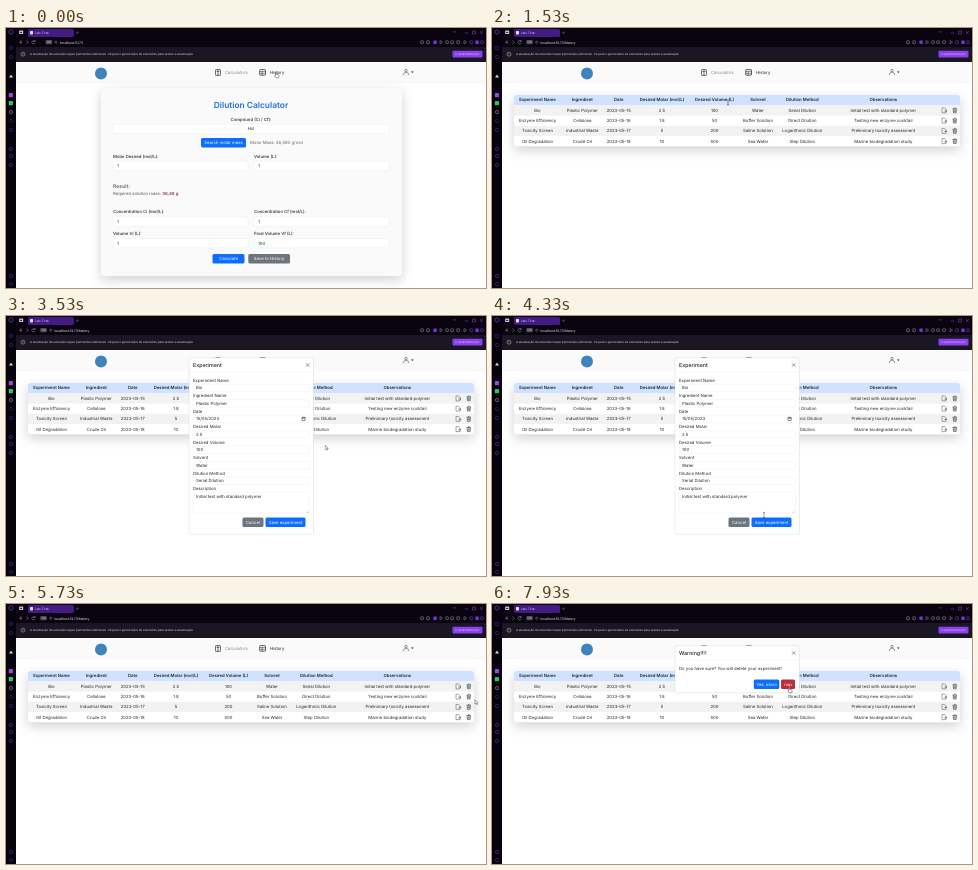
Animation of 480x260 px, one loop 8000 ms. Source, as an HTML page:

```html
<!DOCTYPE html>
<html lang="en">
<head>
<meta charset="utf-8">
<title>Dilution Calculator</title>
<style>
  html, body { margin: 0; width: 100%; height: 100%; overflow: hidden; background: #fff; }
  svg { display: block; width: 480px; height: 260px; }
  text { font-family: Inter, "Open Sans", sans-serif; white-space: pre; text-rendering: geometricPrecision; }
  .plain { font-family: "Liberation Sans", Arial, sans-serif; }
  .shadow { filter: drop-shadow(0 4px 6px rgba(0, 0, 0, .175)); }
</style>
</head>
<body>
<svg id="stage" viewBox="0 0 480 260" xmlns="http://www.w3.org/2000/svg"></svg>
<script>
const BLUE = '#0d6efd', GREY = '#6c757d', INK = '#212529', LINE = '#dee2e6', VIOLET = '#7a35d8';

// Drawing helpers; text is centred vertically on y
const text = (x, y, str, { size = 4.28, fill = INK, weight = 400, anchor = 'start', cls = '' } = {}) =>
  `<text x="${x}" y="${y + size * .35}" font-size="${size}" fill="${fill}" font-weight="${weight}" text-anchor="${anchor}" class="${cls}">${str}</text>`;
const mid = (x, y, str, options) => text(x, y, str, { anchor: 'middle', ...options });
const rect = (x, y, w, h, fill, r = 0, extra = '') =>
  `<rect x="${x}" y="${y}" width="${w}" height="${h}" rx="${r}" fill="${fill}" ${extra}/>`;
const circle = (x, y, r, fill, extra = '') => `<circle cx="${x}" cy="${y}" r="${r}" fill="${fill}" ${extra}/>`;
const stroke = (d, color, width = .6, fill = 'none') =>
  `<path d="${d}" fill="${fill}" stroke="${color}" stroke-width="${width}" stroke-linejoin="round"/>`;
const group = (id, ...parts) => `<g id="${id}">${parts.join('')}</g>`;
const button = (x, y, w, label, fill, h = 9.5) =>
  rect(x, y, w, h, fill, 1.5) + mid(x + w / 2, y + h / 2, label, { fill: '#fff' });
const input = (x, y, w, h, value, pad = 3) =>
  rect(x, y, w, h, '#fff', 1.3, `stroke="${LINE}" stroke-width=".3"`) + text(x + pad, y + h / 2, value);

function browser() {
  const side = [[4, VIOLET], [20, '#4b1e8a'], [29, '#4b1e8a'], [48, '#d8d2e2'], [67, '#9447e8'], [75, '#25c965'],
    [84, '#8f8799'], [93, '#3c1b69'], [102, '#4b1e8a'], [121, '#5a28a5'], [128, '#5a28a5'], [137, '#5a28a5'],
    [248, '#5a28a5'], [256, '#48227c']];
  const tools = [416, 422, 429, 435, 441, 446, 452, 459, 465, 471, 476];
  return rect(0, 0, 480, 34, '#09040f') + rect(0, 0, 10, 260, '#07030c') +
    side.map(([y, c]) => y === 67 || y === 75
      ? rect(2.8, y - 2, 4.2, 4.2, c, .7)
      : y === 48 ? `<path d="M3 49.5L5 46.5L7 49.5Z" fill="${c}"/>`
      : circle(5, y, y === 4 ? 2.1 : 1.6, 'none', `stroke="${c}" stroke-width=".7"`)).join('') +
    rect(13.2, 2.5, 4, 3.6, '#d8d2e2', .6) + rect(14.2, 3.8, 2, 1.2, '#241335') +
    rect(22, 1, 46, 8, '#421c82', 1.5) + rect(24, 3, 3, 3.4, '#e4daf2', .6) +
    text(29, 4.7, 'Lab-Titra', { size: 3.2, fill: '#d9cdec' }) +
    stroke('M69.8 4.7h3M71.3 3.2v3', '#83719d', .4) +
    stroke('M447 3l1.5 1.7L450 3M459 5h3M466.5 3h3v3h-3zM474 3l3 3M477 3l-3 3', '#8c49e5', .5) +
    stroke('M15.5 12.5L13.7 14.2L15.5 16M13.8 14.2h2.5M20.5 12.5L22.3 14.2L20.5 16', '#aaa2b6', .5) +
    stroke('M29 13.2a1.7 1.7 0 1 0 .2 1.8M29.2 12v1.5h-1.5', '#aaa2b6', .5) +
    group('addressBar',
      rect(34.3, 12, 6.5, 4.3, '#51495d', 1), mid(37.5, 14.2, 'VPN', { size: 2.2, fill: '#ddd' }),
      circle(44.7, 14.2, 1.1, 'none', 'stroke="#9b91aa" stroke-width=".5"'),
      '<text id="address" x="48.5" y="15.5" font-size="3.6" class="plain" fill="#e8e2f0"></text>') +
    tools.map((x, i) => i === 2 || i === 9 ? rect(x - 1.6, 12.5, 3.4, 3.4, '#7932e0', .6)
      : i === 3 || i === 7 ? stroke(`M${x - 1} 12.5l2.6 1.7l-2.6 1.7z`, '#9a90aa', .5)
      : rect(x - 1.3, 12.8, 2.7, 2.8, 'none', .6, `stroke="${i > 7 ? '#8240dc' : '#9a90aa'}" stroke-width=".6"`)).join('') +
    rect(10, 19, 470, 15, '#1a1623') +
    circle(17, 26.2, 2, 'none', 'stroke="#c9c1d4" stroke-width=".5"') + stroke('M17 25.8v1.4M17 24.9v.4', '#c9c1d4', .5) +
    text(24, 26.2, 'A atualização da extensão requer permissões adicionais. Vá para o gerenciador de extensões para aceitar a atualização.',
      { size: 3.05, fill: '#d5cddd', cls: 'plain' }) +
    rect(446.5, 22.8, 30, 6.6, '#8a3ff0', .8) + mid(461.5, 26.1, 'Ir para Extensões', { size: 2.9, fill: '#e3cfff' });
}

const caret = '<path d="M404.9 43.5h2.8l-1.4 1.5z" fill="#212529"/>';

const nav = () => circle(95, 45.5, 6, '#3f83bd') +
  rect(209.5, 41.5, 5, 6, 'none', .7, 'stroke="#333" stroke-width=".7"') + rect(210.7, 42.7, 2.6, 1.1, '#333') +
  stroke('M211 45h2M211 46.3h2', '#333', .6) +
  text(219, 44.4, 'Calculators', { fill: '#85898d' }) +
  rect(253.7, 41.6, 5.8, 5.6, 'none', .6, 'stroke="#222" stroke-width=".7"') + stroke('M253.7 43.4h5.8M253.7 45.3h5.8M256.2 43.4v3.8', '#222', .5) +
  text(264, 44.4, 'History') +
  circle(400, 42.6, 1.3, 'none', 'stroke="#333" stroke-width=".5"') +
  stroke('M397.3 47.2c0-4 5.4-4 5.4 0', '#333', .5) + caret;

const plainNav = () => mid(232, 44.4, 'Calculators', { size: 4, fill: '#8b8f93', cls: 'plain' }) +
  mid(262, 44.4, 'History', { size: 4, cls: 'plain' }) + caret;

function calculator() {
  const field = (x, y, label, value) => text(x, y, label, { weight: 500 }) + input(x, y + 5, 135, 9.3, value, 4);
  return rect(95, 60, 301, 188, '#fafafb', 3, 'class="shadow"') +
    mid(245, 77.5, 'Dilution Calculator', { size: 8.4, fill: '#1f72d8', weight: 600 }) +
    mid(245, 91.2, 'Compound (Ci / Cf):', { weight: 500 }) +
    input(107, 96.3, 276, 9.5, '') + mid(245, 101, 'Hcl') +
    button(195, 110, 45, 'Search molar mass', BLUE) +
    text(244, 114.8, 'Molar Mass: 36,460 g/mol', { fill: '#60666c' }) +
    field(107, 128.3, 'Molar Desired (mol/L):', '1') + field(248, 128.3, 'Volume (L):', '1') +
    text(107, 158, 'Result:', { size: 5.2, fill: '#52575c', weight: 500 }) +
    text(107, 165.8, 'Required solution mass: <tspan font-weight="600" fill="#8d3044">36,46 g</tspan>', { fill: '#50555a' }) +
    field(107, 184, 'Concentration Ci (mol/L):', '1') + field(248, 184, 'Concentration Cf (mol/L):', '1') +
    field(107, 205.5, 'Volume Vi (L):', '1') + field(248, 205.5, 'Final Volume Vf (L):', '100') +
    button(206.5, 226, 32, 'Calculate', BLUE) + button(242.3, 226, 41.7, 'Save to History', GREY);
}

const headings = ['Experiment Name', 'Ingredient', 'Date', 'Desired Molar (mol/L)', 'Desired Volume (L)', 'Solvent', 'Dilution Method', 'Observations'];
const experiments = [
  ['Bio', 'Plastic Polymer', '2023-05-15', '2.5', '100', 'Water', 'Serial Dilution', 'Initial test with standard polymer'],
  ['Enzyme Efficiency', 'Cellulose', '2023-05-16', '1.8', '50', 'Buffer Solution', 'Direct Dilution', 'Testing new enzyme cocktail'],
  ['Toxicity Screen', 'Industrial Waste', '2023-05-17', '5', '200', 'Saline Solution', 'Logarithmic Dilution', 'Preliminary toxicity assessment'],
  ['Oil Degradation', 'Crude Oil', '2023-05-18', '10', '500', 'Sea Water', 'Step Dilution', 'Marine biodegradation study']];

const tableBase = height => rect(22, 67, 446, height, '#fff', 3, 'class="shadow"') +
  '<path d="M22 77.3V70q0-3 3-3H465q3 0 3 3v7.3z" fill="#cfe2ff"/>';

const emptyTable = () => tableBase(28.5) +
  '<path d="M22 77.3H456V95.5H25q-3 0-3-3z" fill="#f1f1f1"/>' +
  [51, 97.5, 125.5, 169, 233.5, 278, 318, 400].map((x, i) =>
    mid(x, 72, headings[i], { size: 4, weight: 700, cls: 'plain' })).join('') +
  mid(239, 86.3, 'No experiments found.', { size: 4, fill: '#85888b', cls: 'plain' });

function table() {
  const columns = [45.5, 90.3, 126.7, 170, 222.5, 266, 310.3, 391.3];
  const cells = (values, y, weight) => values.map((v, i) => mid(columns[i], y, v, { weight })).join('');
  const icons = y => stroke(`M450 ${y - 2.5}h2.6l1.4 1.4v3.6h-4zM452.2 ${y + .6}h2.6M453.8 ${y - .6}l1.2 1.2l-1.2 1.2`, '#4d5155', .5) +
    stroke(`M460.6 ${y - 1.6}h4.4M462 ${y - 2.4}h1.6M461.2 ${y - 1.6}l.3 4h2.6l.3-4M462.3 ${y - .6}v2M463.3 ${y - .6}v2`, '#222', .55);
  return tableBase(51.3) + cells(headings, 72, 600) + experiments.map((row, i) => {
    const y = 82.4 + i * 10.25;
    return (i % 2 ? '' : rect(22, y - 5.1, 446, 10.25, '#f2f2f2')) + cells(row, y, 400) + icons(y);
  }).join('');
}

const dialog = (title, height) =>
  rect(183, 41.8, 124.5, height, '#fff', 2, 'stroke="#cfcfcf" stroke-width=".4"') +
  text(187, 49, title, { size: 5.3, weight: 500 }) +
  stroke('M300 47.3l3.4 3.4M303.4 47.3l-3.4 3.4', '#555', .6) + stroke('M183 56.3h124.5', LINE, .3);

function editDialog() {
  const labels = ['Experiment Name', 'Ingredient Name', 'Date', 'Desired Molar', 'Desired Volume', 'Solvent', 'Dilution Method', 'Description'];
  const values = [...experiments[0]];
  values[2] = '15/05/2023';
  return dialog('Experiment', 176.5) + labels.map((label, i) => {
    const y = 64.2 + i * 15.47;
    const boxed = label === 'Description'
      ? input(187, y + 3.6, 116.5, 21, '') + text(190, y + 8, values[i])
      : input(187, y + 4.1, 116.5, 7.4, values[i]);
    return text(187, y, label) + boxed;
  }).join('') +
    rect(296, 101.3, 3.2, 3.2, 'none', .3, 'stroke="#222" stroke-width=".5"') + stroke('M296 102h3.2', '#222', .7) +
    stroke('M300.6 197l1.8-1.8M301.7 197l.7-.7', '#777', .3) +
    button(236.5, 201.5, 21, 'Cancel', GREY) + button(259.5, 201.5, 40, 'Save experiment', BLUE);
}

const deleteDialog = () => dialog('Warning!!!!', 47) +
  text(187, 64.2, 'Do you have sure? You will delete your experiment!') +
  button(261.8, 75.5, 25.5, 'Yes, obvio', BLUE) + button(289, 75.5, 14, 'nop', '#bb2d3b');

const pointers = () =>
  group('hand', stroke('M-.5 -.5q.7-.9 1.3 0v2.2l2.2.5q.8.3.6 1.3l-.5 2.2h-2.8l-2-2.4q.1-.9 1.2-.1z', '#111', .5, '#fff')) +
  group('beam', stroke('M-1 -3h2M0 -3v6M-1 3h2', '#222', .55)) +
  group('arrow', stroke('M0 -2v5l1.2-1l.8 1.8l.8-.4l-.8-1.7h1.6z', '#111', .4, '#fff'));

document.getElementById('stage').innerHTML =
  rect(0, 0, 480, 260, '#fff') + rect(10, 34, 470, 20.5, '#fafafa') + stroke('M10 54.5h470', '#efefef', .4) +
  group('nav', nav()) + group('plainNav', plainNav()) +
  group('calculator', calculator()) + group('emptyTable', emptyTable()) + group('table', table()) +
  group('edit', editDialog()) + group('remove', deleteDialog()) + browser() + group('cursor', pointers());

const LOOP = 8000, RELOAD = 530, LOADED = 1000;
const el = id => document.getElementById(id);
const show = (id, on) => el(id).setAttribute('display', on ? 'inline' : 'none');
const clamp = v => Math.max(0, Math.min(1, v));
const easeOut = p => 1 - (1 - p) ** 2;

// [time, x, y, pointer shape from this time on]
const path = [
  [0, 270, 45, 'hand'], [400, 270, 45, 'arrow'], [800, 225, 75, 'beam'], [1000, 225, 75, 'beam'],
  [1400, 236, 74.5, 'beam'], [1800, 236, 74.5, 'arrow'], [2500, 453, 84, 'hand'], [3220, 453, 84, 'arrow'],
  [3480, 320, 130, 'arrow'], [4200, 272, 199, 'beam'], [4450, 272, 199, 'arrow'], [4750, 273, 206, 'hand'],
  [5300, 273, 206, 'arrow'], [5680, 469, 97.5, 'arrow'], [6200, 469, 97.5, 'arrow'], [6550, 462.5, 83.5, 'hand'],
  [7080, 462.5, 83.5, 'arrow'], [7650, 297, 84, 'hand'], [LOOP, 297, 84, 'hand']];

function moveCursor(t) {
  const i = path.findIndex((_, k) => t < path[k + 1][0]);
  const [t0, x0, y0, shape] = path[i], [t1, x1, y1] = path[i + 1];
  const p = (t - t0) / (t1 - t0), e = p * p * (3 - 2 * p);
  el('cursor').setAttribute('transform', `translate(${x0 + (x1 - x0) * e} ${y0 + (y1 - y0) * e}) scale(.85)`);
  ['hand', 'beam', 'arrow'].forEach(id => show(id, id === shape));
}

function moveDialog(id, t, open, close = Infinity) {
  const closing = t >= close;
  const age = t - (closing ? close : open);
  const fade = clamp(age / 150), slide = easeOut(clamp(age / 300));
  el(id).setAttribute('opacity', closing ? 1 - fade : fade);
  el(id).setAttribute('transform', `translate(0 ${-12.5 * (closing ? slide : 1 - slide)})`);
}

function draw(now) {
  const t = now % LOOP;
  const onCalculator = t < RELOAD, loading = !onCalculator && t < LOADED;
  show('calculator', onCalculator);
  show('nav', !loading);
  show('plainNav', loading);
  show('emptyTable', loading);
  show('table', t >= LOADED);
  el('address').textContent = 'localhost:5173' + (onCalculator ? '' : '/history');
  el('addressBar').setAttribute('transform', `translate(${onCalculator ? 5.3 : 0} 0)`);
  moveDialog('edit', t, 3210, 5300);
  moveDialog('remove', t, 7050);
  moveCursor(t);
}

const start = performance.now();
(function tick() {
  draw(performance.now() - start);
  requestAnimationFrame(tick);
})();
</script>
</body>
</html>
```
